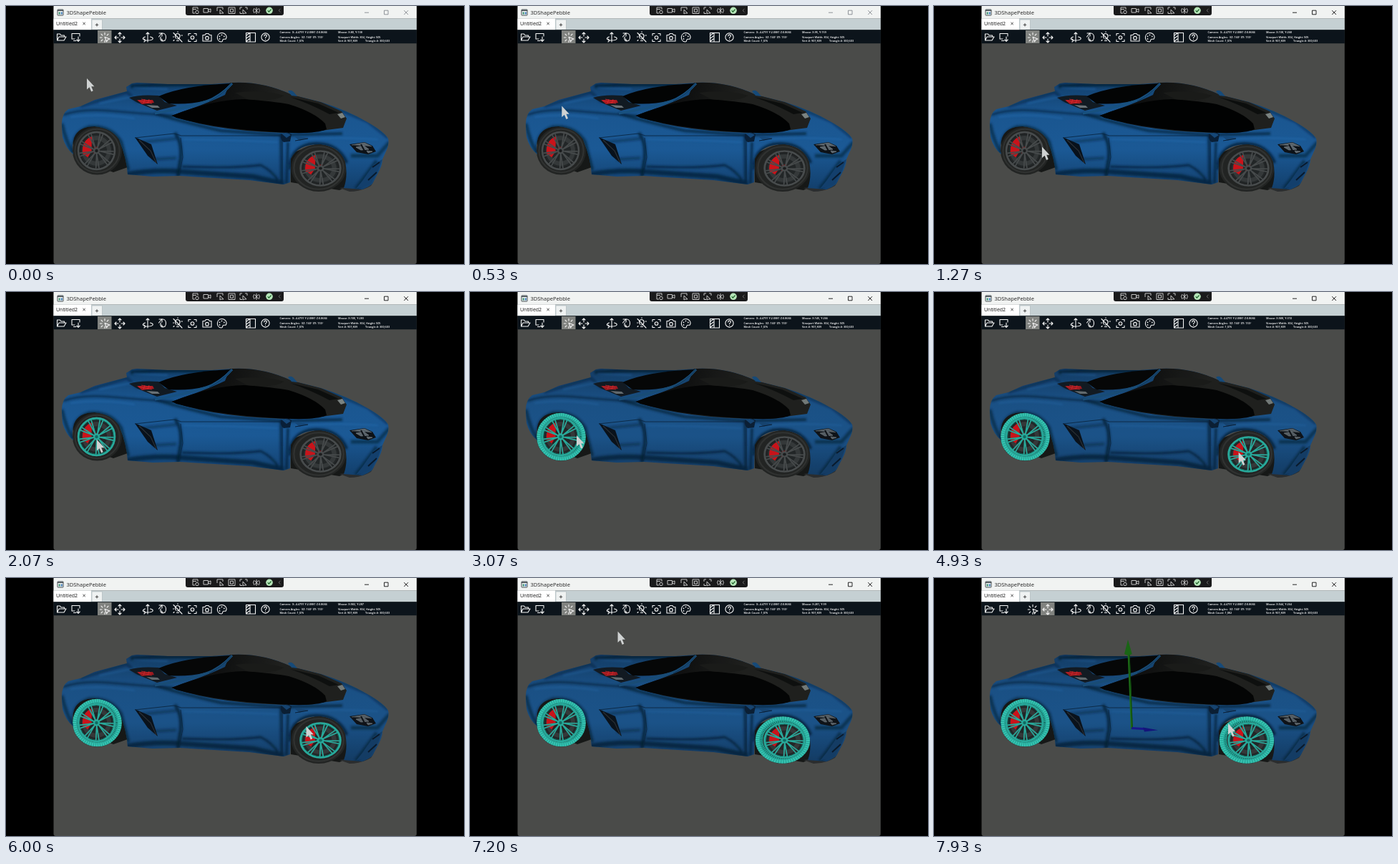
An HTML page that plays this animation: 640 by 360 pixels, repeating every 8000 ms.

```html
<!DOCTYPE html>
<html lang="en">
<head>
<meta charset="utf-8">
<title>Model viewer</title>
<style>
html, body { margin: 0; width: 100%; height: 100%; overflow: hidden; background: #000; }
svg { display: block; width: 100vw; height: 100vh; }
text { font-family: "Open Sans", sans-serif; white-space: pre; }
.info text { font-size: 3.8px; font-weight: 600; fill: #fff; }
.icons { fill: none; stroke: #f4f4f4; stroke-width: 1.1; stroke-linecap: round; stroke-linejoin: round; }
.mini { fill: none; stroke: #d6d6d6; stroke-width: .9; }
</style>
</head>
<body>
<svg viewBox="0 0 640 360" xmlns="http://www.w3.org/2000/svg">
<defs>
  <linearGradient id="paint" x1="0" y1="106" x2="0" y2="258" gradientUnits="userSpaceOnUse">
    <stop offset="0" stop-color="#123f6c"/><stop offset=".3" stop-color="#1a5690"/>
    <stop offset=".62" stop-color="#1b5995"/><stop offset="1" stop-color="#123e6a"/>
  </linearGradient>
  <linearGradient id="roof" x1="300" y1="106" x2="380" y2="134" gradientUnits="userSpaceOnUse">
    <stop offset="0" stop-color="#0d0e0e"/><stop offset="1" stop-color="#1f201e"/>
  </linearGradient>
  <filter id="soft" x="-20%" y="-20%" width="140%" height="140%"><feGaussianBlur stdDeviation="1.8"/></filter>
  <path id="shell" d="M78 168Q77 151 87 144L104 140L124 131L169 119L168 113L176 108L183 107L226 109L288 109L316 107
    Q360 105 400 124L440 134Q478 146 505 162Q528 175 534 185Q536 193 530 205L526 214Q526 222 520 233L512 248
    Q507 253 498 256L472 254Q478 238 474 217Q466 196 440 193Q408 192 398 213L397 246L388 249L340 243L243 237
    L205 238L170 235Q169 214 158 186Q147 170 124 168Q101 168 95 184Q91 197 94 207Q83 198 79 183Z"/>
  <clipPath id="inShell"><use href="#shell"/></clipPath>
</defs>

<!-- window -->
<rect x="66.5" width="507.3" height="360" rx="3" fill="#4a4b49"/>
<rect x="66.5" width="507.3" height="17.5" fill="#f1f3f2"/>
<rect x="66.5" y="17.5" width="507.3" height="15.8" fill="#c5d0d3"/>
<rect x="66.5" y="17.5" width="52.5" height="15.8" fill="#fff"/>
<rect x="120" y="19" width="14.5" height="14" fill="#eff2f2" stroke="#a9b3b6" stroke-width=".6"/>
<rect x="72" y="5" width="8" height="8" rx=".5" fill="#fff" stroke="#3f484d" stroke-width="1"/>
<path d="M72 6.3H80" stroke="#3f484d" stroke-width="1.5"/>
<rect x="73.5" y="8.4" width="2.4" height="3.2" fill="#48977a"/>
<rect x="76.8" y="8.4" width="2" height="3.2" fill="#3a79b7"/>
<text x="84.5" y="11.8" font-size="7.5" fill="#222">3DShapePebble</text>
<text x="70" y="27.2" font-size="7" fill="#111">Untitled2</text>
<path d="M107.4 22.8L110.8 26.2M110.8 22.8L107.4 26.2M124.8 26.3H129.2M127 24.1V28.5" stroke="#222" stroke-width=".8"/>
<path id="controls" d="M501 9.2H507M528.5 6.2H534V11.8H528.5ZM556.2 6.2L562 12M562 6.2L556.2 12" fill="none" stroke-width=".9"/>
<rect x="66.5" y="33.3" width="507.3" height="18.9" fill="#0c141b"/>
<rect id="tool" y="34" width="19.5" height="18" fill="#80827f"/>

<!-- debug strip -->
<path d="M251 0H388V10Q388 13 385 13H254Q251 13 251 10Z" fill="#1a1a1b"/>
<g class="mini">
  <path d="M261 2H268V5M261 2V10H264M261 4.5H266M276 3.5H282.5V9H276ZM282.5 5.6L286 4V8.6L282.5 7M295 7V2H303V5M299 5L304 10H300.5L299 11ZM311 2H320V10.5H311ZM313.5 4.3H317.5V8.3H313.5ZM327 5V2H330M334 2H337V5M327 8V10.5H330M331 5L336 10H333L331 11ZM347 3Q344 6 347 10M353 3Q356 6 353 10M348 4L352 9M352 4L348 9M350 2V11"/>
  <circle cx="267" cy="8.5" r="2.2"/>
  <path d="M383.5 4L381 6.3L383.5 8.6" stroke="#777"/>
</g>
<circle cx="368" cy="6.3" r="4.8" fill="#b5e5b8"/><path d="M365.7 6.4L367.4 8.1L370.5 4.7" fill="none" stroke="#145b20" stroke-width="1.2"/>

<!-- toolbar -->
<g class="icons">
  <path d="M71.5 48V39H75.5L77 41H81.5V43M71.5 48L74 43H84L81 48Z"/>
  <path d="M96 46H92V38.5H103V42M94.5 48.5H98M101 43V49M98.8 47L101 49.3L103.2 47"/>
  <path d="M138 37.3V40M133 39.2L134.8 41M143 39.2L141.2 41M131.3 44H134M133 48.8L134.8 47M138 50.5V48M138 43.2L145 46L141.9 47.2L140.6 50Z"/>
  <path d="M159 37V42M159 46V51M152 44H157M161 44H166M157 39L159 37L161 39M157 49L159 51L161 49M154 42L152 44L154 46M164 42L166 44L164 46"/>
  <path d="M198 37V50M196 39L198 37L200 39M194.5 43C189 45 191 48 198 48C207 48 207 44 201.5 43M193 45.8L195 48L193 50"/>
  <path d="M213.5 43L218 37.5M214 38H218V42M219 38C225 38 225 49 219 49C215.8 49 215.3 45 216.3 43M217.5 46L219 49L222.3 48"/>
  <path d="M234 37.5L246 50M237.5 45C234.5 40 239 37 242 39.5C244.8 42 242 44 241.7 46H239M238.5 48.5H241.5M233.5 43H234.5M245 41H246.5M240 35.7V36.4M235 47.5L234 48.5"/>
  <path d="M255 41V38.5H258M263 38.5H266V41M266 47V49.5H263M258 49.5H255V47"/><circle cx="260.5" cy="44" r="2.3"/>
  <path d="M275 40.5H278L279.3 38.5H283L284.3 40.5H287V49H275Z"/><circle cx="281" cy="44.7" r="2.3"/>
  <path d="M301.5 37.5C293.5 37.8 293.3 49.5 301 50C304 50 301.5 46.5 304 46.2H307C310 42 306 37.4 301.5 37.5Z"/>
  <path d="M298.5 42.4V42.5M301.5 40.4V40.5M304.8 42.4V42.5M298.5 45.8V45.9" stroke-width="1.7"/>
  <path d="M335.5 37.5H348.5V50H335.5ZM341 37.5V50M336 41L340 38M336 45L340 42M336 49L340 46"/>
  <circle cx="362.5" cy="43.5" r="5.6"/><path d="M360.7 42C360.7 39.4 364.5 39.6 364.4 41.8C364.3 43.2 362.5 43 362.5 44.6M362.5 46.5V46.6"/>
</g>
<g class="info">
  <text x="382.5" y="38">Camera:</text><text x="400" y="38">X:-4.4791 Y:2.0881 Z:0.8684</text>
  <text x="382.5" y="44.6">Camera Angles:</text><text x="413" y="44.6">XZ: 160° XY: 155°</text>
  <text x="382.5" y="50.4" id="mesh"></text>
  <text x="464" y="38" id="mouse"></text>
  <text x="464" y="44.6">Viewport Width: 834, Height: 505</text>
  <text x="464" y="50.4">Vert #: 901,809</text><text x="502" y="50.4">Triangle #: 300,603</text>
</g>

<!-- car -->
<path d="M92 178Q106 160 140 166Q163 178 170 225L150 232L96 212ZM397 206L440 190L474 208L480 250L466 257L398 246Z" fill="#161817"/>
<path d="M466 254L500 250L514 244L510 251Q496 259 480 259Z" fill="#2b2d2e"/>
<g id="wheels"></g>
<use href="#shell" fill="url(#paint)"/>
<g clip-path="url(#inShell)">
  <g filter="url(#soft)" fill="none" stroke="#071c33">
    <path d="M80 152Q104 143 142 146L190 150L234 153" stroke-width="2.5" opacity=".7"/>
    <path d="M104 140L169 120L184 134" stroke-width="3" opacity=".5"/>
    <path d="M95 205Q91 177 116 169Q147 166 161 190L171 229" stroke-width="4.5" opacity=".65"/>
    <path d="M398 228Q396 200 424 193Q463 188 476 219" stroke-width="4.5" opacity=".8"/>
    <path d="M208 150Q240 160 300 174L386 180L470 178" stroke-width="4" opacity=".65"/>
    <path d="M236 177Q246 190 244 212L240 238" stroke-width="4.5" opacity=".75"/>
    <path d="M168 235Q206 228 244 231L345 238L388 248" stroke-width="7" opacity=".7"/>
    <path d="M246 224Q318 227 356 222Q372 230 380 243" stroke-width="3" opacity=".75"/>
    <path d="M384 179L385 245M394 190L392 248" stroke-width="3.5" opacity=".7"/>
    <path d="M174 112Q230 108 292 111" stroke-width="5" opacity=".75"/>
    <path d="M78 164Q84 190 94 206" stroke-width="5" opacity=".6"/>
    <path d="M536 190L519 209L482 209M518 216L489 255" stroke-width="5" opacity=".6"/>
    <path d="M400 124L440 134L505 161L534 184" stroke-width="3" opacity=".5"/>
    <path d="M190 190L238 185M205 214L238 212" stroke-width="4" opacity=".4"/>
  </g>
  <g fill="none" stroke="#2874ba" stroke-width="1.5" opacity=".6" filter="url(#soft)">
    <path d="M90 155Q130 149 180 157M247 186Q320 187 380 190M404 187Q455 182 520 186M178 114L226 116M130 136L180 126"/>
  </g>
  <path d="M172 128Q186 123 213 125L222 134L239 139L211 146L184 135Z" fill="#111a22"/>
  <path d="M183 131L205 131L207 135L190 137Z" fill="#a51a20"/>
  <path d="M185 132L204 136M189 130L203 133M194 130L192 136M200 130L198 136" stroke="#e52a2e" stroke-width=".7"/>
  <path d="M196 138L212 139L215 142L204 142Z" fill="#697176"/>
  <path d="M213 126Q247 111 314 108Q299 124 279 132Q254 138 227 136Z" fill="#030404"/>
  <path d="M313 107Q354 103 398 123L440 134L469 147L476 157L471 170L448 173L420 177Q302 178 231 153Q279 137 306 124Z" fill="url(#roof)"/>
  <path d="M232 153Q286 131 333 130Q374 133 395 137Q431 148 446 164L448 172Q434 178 400 177Q307 174 238 156Z" fill="#010202"/>
  <path d="M320 121Q357 116 389 125Q375 134 337 130" fill="#1a1b19"/>
  <path d="M397 127L436 136L465 149L452 151Q426 137 397 127Z" fill="#0c0e0d"/>
  <path d="M316 108Q303 123 286 131Q250 143 208 150" fill="none" stroke="#18517f" stroke-width="3"/>
  <path d="M315 109Q302 124 284 133" fill="none" stroke="#0d2e50" stroke-width=".8"/>
  <path d="M180 183L203 193L212 221L198 209Z" fill="#08111b"/>
  <path d="M186 187L202 202L210 219" fill="none" stroke="#2b3136" stroke-width="1.2"/>
  <path d="M180 184L235 178L245 181L383 181M244 184L247 211L242 236M386 182L386 247" fill="none" stroke="#0a2744" stroke-width=".9"/>
  <path d="M480 193L501 190L512 195L517 203L506 207L490 204Z" fill="#0d1217"/>
  <path d="M483 194L501 191L511 196M489 197L500 195L507 200L496 201ZM504 202L512 203L506 205Z" fill="#59636a" stroke="#7e898f" stroke-width=".6"/>
  <path d="M496 193L502 204" stroke="#0d1217" stroke-width="2"/>
  <path d="M526 214L514 221L498 244L489 255L509 249L520 230Z" fill="#133f6c"/>
  <path d="M522 218L512 225M518 232L506 243" stroke="#081a2d" stroke-width="2"/>
  <path d="M463 151L470 149L474 155L468 157Z" fill="#7b8381"/>
</g>
<path d="M394 119Q398 116 402 120L407 126L399 125Z" fill="#164a79"/>
<path d="M384 179Q393 174 399 179L397 189L388 190Q383 187 384 179Z" fill="#091f37"/>
<path d="M385 178Q393 175 398 180L392 184ZM402 181L423 184L410 188Z" fill="#154778"/>
<path d="M404 188L422 185" stroke="#081c33"/>
<use href="#shell" id="dim" fill="#222" opacity=".1"/>

<g id="gizmo">
  <path d="M276.5 211L272 104" stroke="#1d6d17" stroke-width="3"/>
  <path d="M277.2 210L273 106" stroke="#0e420c" stroke-width="1"/>
  <path d="M271 86L276.7 106Q271 109.5 266 106Z" fill="#1a6515"/>
  <path d="M276 209.5L293 210.5" stroke="#17178a" stroke-width="2.8"/>
  <path d="M292 208.5L313 212.3L294 214.5Z" fill="#14147b"/>
</g>
<path id="cursor" d="M0 0V15.5L3.6 12.2L6.2 18.4L8.7 17.3L6.2 11.3H10.4Z" fill="#cfd2d2"/>
</svg>
<script>
const $ = id => document.getElementById(id);
const LOOP = 8000, LAG = 67, TEAL = '#26aa9b', DEEP = '#136a61';

const ring = (r, color, w, extra = '') =>
  `<circle r="${r}" fill="none" stroke="${color}" stroke-width="${w}" ${extra}/>`;

// each spoke is a narrow V opening towards the rim
function spokes(n, color) {
  let d = '';
  for (let i = 0; i < n; i++) {
    const a = i / n * Math.PI * 2 + .12;
    const at = (r, off) => (r * Math.cos(a + off)).toFixed(3) + ' ' + (r * Math.sin(a + off)).toFixed(3);
    d += `M${at(.9, -.09)}L${at(.15, 0)}L${at(.9, .09)}`;
  }
  return `<path d="${d}" fill="none" stroke="${color}" stroke-width=".06"/>`;
}

const rim = (color, edge) => ring(.94, color, .1) + ring(.87, edge, .03) + spokes(9, color) +
  `<circle r=".17" fill="${color}"/><circle r=".08" fill="${edge}"/>`;

function wheel(name, tyre, hub) {
  const put = ([x, y, rx, ry]) => `transform="translate(${x} ${y}) scale(${rx} ${ry})"`;
  const lit = ring(.86, TEAL, .27) + ring(.92, '#3cc8b6', .13, 'stroke-dasharray=".04 .05"') +
    ring(.78, DEEP, .08, 'stroke-dasharray=".03 .04"');
  return `<g ${put(tyre)}><circle r="1" fill="#222423"/>${ring(.9, '#303231', .06)}
      <g id="${name}Tyre">${lit}</g></g>
    <g ${put(hub)}><circle r=".98" fill="#222627"/>${ring(.65, '#343839', .22)}
      <path d="M-.24 -.74Q-.78 -.53 -.72 .14L-.45 .34L-.26 .02Z" fill="#c9131a"/>
      <path d="M-.12 -.18L.1 -.22L.04 .1L-.15 .18Z" fill="#9d1518"/>
      <g>${rim('#474b4c', '#1b1d1e')}</g><g id="${name}Rim">${rim(TEAL, DEEP)}</g></g>`;
}
$('wheels').innerHTML = wheel('rear', [127.5, 202, 34.5, 33.5], [126.5, 202, 27, 27.5]) +
  wheel('front', [437, 226, 38.5, 33], [439.5, 226.5, 29.5, 25.5]);

// time, tip x, tip y
const path = [
  [-LAG, 115.5, 118], [0, 113, 101], [70, 113, 101], [1130, 151, 196.5], [1270, 151, 196.5],
  [2070, 127, 206], [2330, 127, 206], [2670, 155, 195.5], [3000, 155, 195.5], [3070, 149, 200],
  [4070, 411, 214], [4270, 411, 214], [5270, 431, 227], [5530, 431, 227], [6000, 419.5, 207],
  [6670, 419.5, 207], [7400, 159, 45], [7470, 159, 45], [7930, 411, 203], [LOOP, 413, 204]
];

function sample(t) {
  const i = path.findIndex((p, k) => k && t <= p[0]), a = path[i - 1], b = path[i];
  let u = (t - a[0]) / (b[0] - a[0]);
  u = u * u * (3 - 2 * u);
  return a.map((v, k) => v + (b[k] - v) * u);
}

const show = (id, on) => $(id).style.display = on ? '' : 'none';

function draw(t) {
  const [, x, y] = sample(t), [, mx, my] = sample(t - LAG), moving = t >= 7530;
  $('cursor').setAttribute('transform', `translate(${x.toFixed(2)} ${y.toFixed(2)})`);
  $('mouse').textContent = `Mouse: X:${Math.round((mx - 67) / .607)}, Y:${Math.round((my - 34) / .607)}`;
  $('mesh').textContent = 'Mesh Count: ' + (moving ? '1,082' : '1,076');
  $('controls').setAttribute('stroke', t < 1000 ? '#858a8f' : '#111');
  $('tool').setAttribute('x', moving ? 149 : 128);
  show('rearRim', t >= 1340);
  show('rearTyre', t >= 2870);
  show('frontRim', t >= 4270);
  show('frontTyre', t >= 6670);
  show('dim', t >= 2870);
  show('gizmo', moving);
}

const start = performance.now();
(function tick() {
  draw((performance.now() - start) % LOOP);
  requestAnimationFrame(tick);
})();
</script>
</body>
</html>
```
